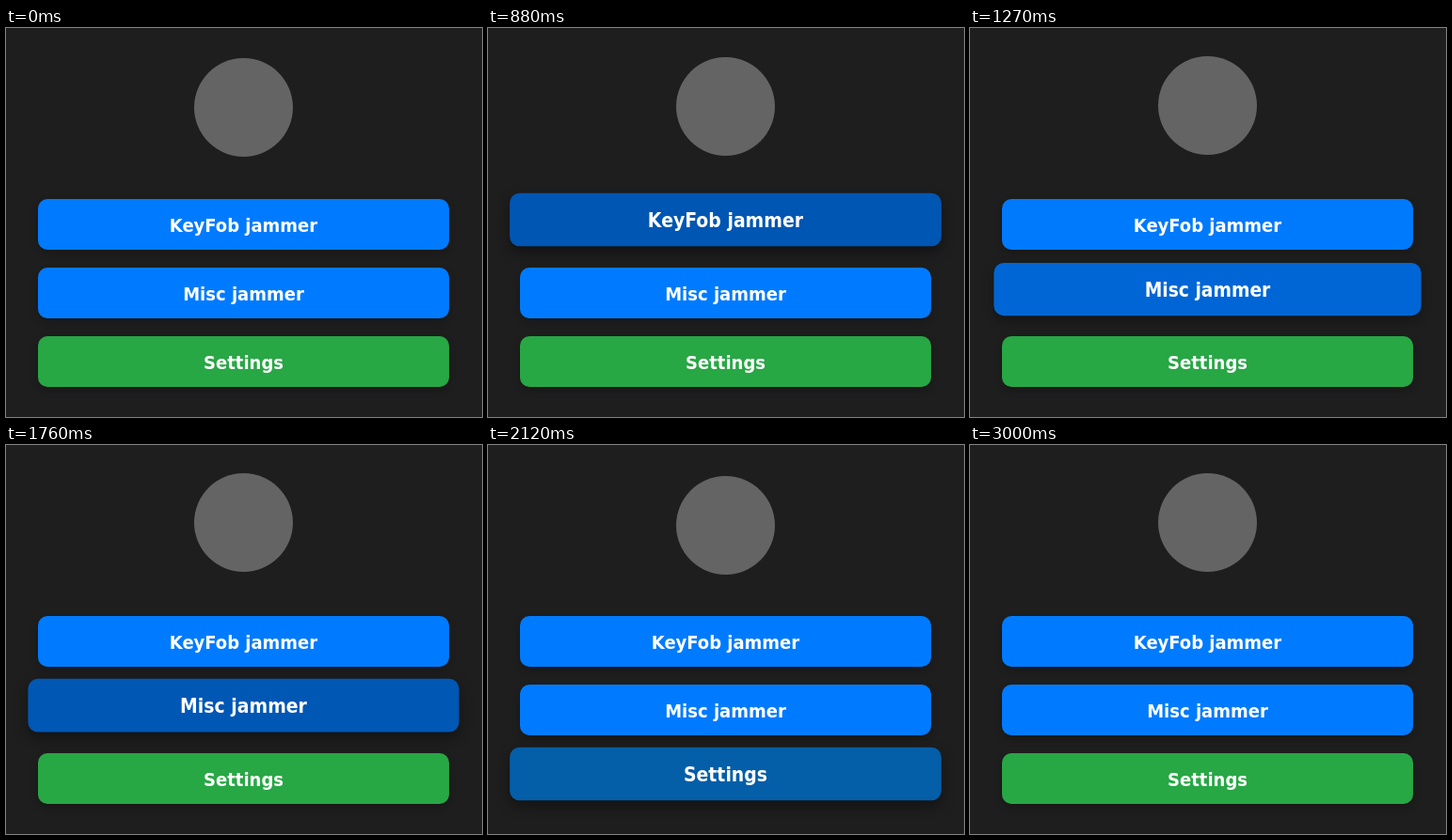
Animation of 506x414 px, one loop 3.03 s. Source, as an HTML page with a canvas:

```html
<!DOCTYPE html>
<html lang="en">
<head>
<meta charset="utf-8">
<title>Jammer menu</title>
<style>
  html, body { margin: 0; width: 100%; height: 100%; overflow: hidden; background: #1e1e1e; }
  canvas { display: block; }
</style>
</head>
<body>
<canvas id="stage" width="506" height="414"></canvas>
<script>
const ctx = document.getElementById('stage').getContext('2d');
const LOOP = 3030;
const CX = 252.5;
const BLUE = [0, 123, 255], GREEN = [40, 167, 69], HOVER = [0, 86, 179];

// enter and leave: when the pointer moves on and off each button
const buttons = [
  { label: 'KeyFob jammer', y: 209, color: BLUE, enter: 482, leave: 1030 },
  { label: 'Misc jammer', y: 282, color: BLUE, enter: 1174, leave: 1752 },
  { label: 'Settings', y: 355, color: GREEN, enter: 1936, leave: 2485 }
];

const clamp = v => Math.min(1, Math.max(0, v));
const mix = (a, b, k) => a + (b - a) * k;

// cubic-bezier(.25, .1, .25, 1)
function ease(x) {
  if (x <= 0 || x >= 1) return clamp(x);
  const bez = (s, a, b) => 3 * a * s * (1 - s) ** 2 + 3 * b * s * s * (1 - s) + s ** 3;
  let lo = 0, hi = 1;
  for (let i = 0; i < 24; i++) {
    const mid = (lo + hi) / 2;
    if (bez(mid, 0.25, 0.25) < x) lo = mid; else hi = mid;
  }
  return bez(lo, 0.1, 1);
}

function hover(b, t, duration) {
  return t < b.leave
    ? ease(clamp((t - b.enter) / duration))
    : 1 - ease(clamp((t - b.leave) / duration));
}

function drawEmblem(t) {
  // Alternating one-second float, highest at 1400 ms
  const phase = (t + 600) % 2000;
  const p = 1 - Math.abs(phase - 1000) / 1000;
  const top = Math.round(29.85 + 5.4 * (1 - ease(1 - Math.abs(1 - p - 1))));
  const rise = ease(1 - Math.min(phase, 2000 - phase) / 1000);
  const y = Math.round(29.85 + 5.4 * (1 - rise));
  ctx.fillStyle = '#646464';
  ctx.beginPath();
  ctx.arc(CX, y + 52.5, 52.5, 0, Math.PI * 2);
  ctx.fill();
}

function drawButton(b, t) {
  const move = hover(b, t, 200);
  const tint = hover(b, t, 300);
  const rgb = b.color.map((c, i) => Math.round(mix(c, HOVER[i], tint)));

  ctx.save();
  ctx.translate(CX, b.y - 5 * move);
  ctx.scale(1 + 0.05 * move, 1 + 0.05 * move);

  ctx.save();
  ctx.shadowColor = `rgba(0, 0, 0, ${mix(0.2, 0.4, tint)})`;
  ctx.shadowOffsetY = mix(4, 6, tint);
  ctx.shadowBlur = mix(8, 14, tint);
  ctx.fillStyle = `rgb(${rgb})`;
  ctx.beginPath();
  ctx.roundRect(-218.5, -27, 437, 54, 10);
  ctx.fill();
  ctx.restore();

  ctx.fillStyle = '#fff';
  ctx.fillText(b.label, 0, 7.5);
  ctx.restore();
}

function draw(now) {
  const t = now % LOOP;
  ctx.fillStyle = '#1e1e1e';
  ctx.fillRect(0, 0, 506, 414);
  ctx.font = 'bold 20px "DejaVu Sans Condensed", "Open Sans", "Noto Sans", sans-serif';
  ctx.textAlign = 'center';
  drawEmblem(t);
  buttons.forEach(b => drawButton(b, t));
}

const start = performance.now();
function tick() {
  draw(performance.now() - start);
  requestAnimationFrame(tick);
}
tick();
</script>
</body>
</html>
```
